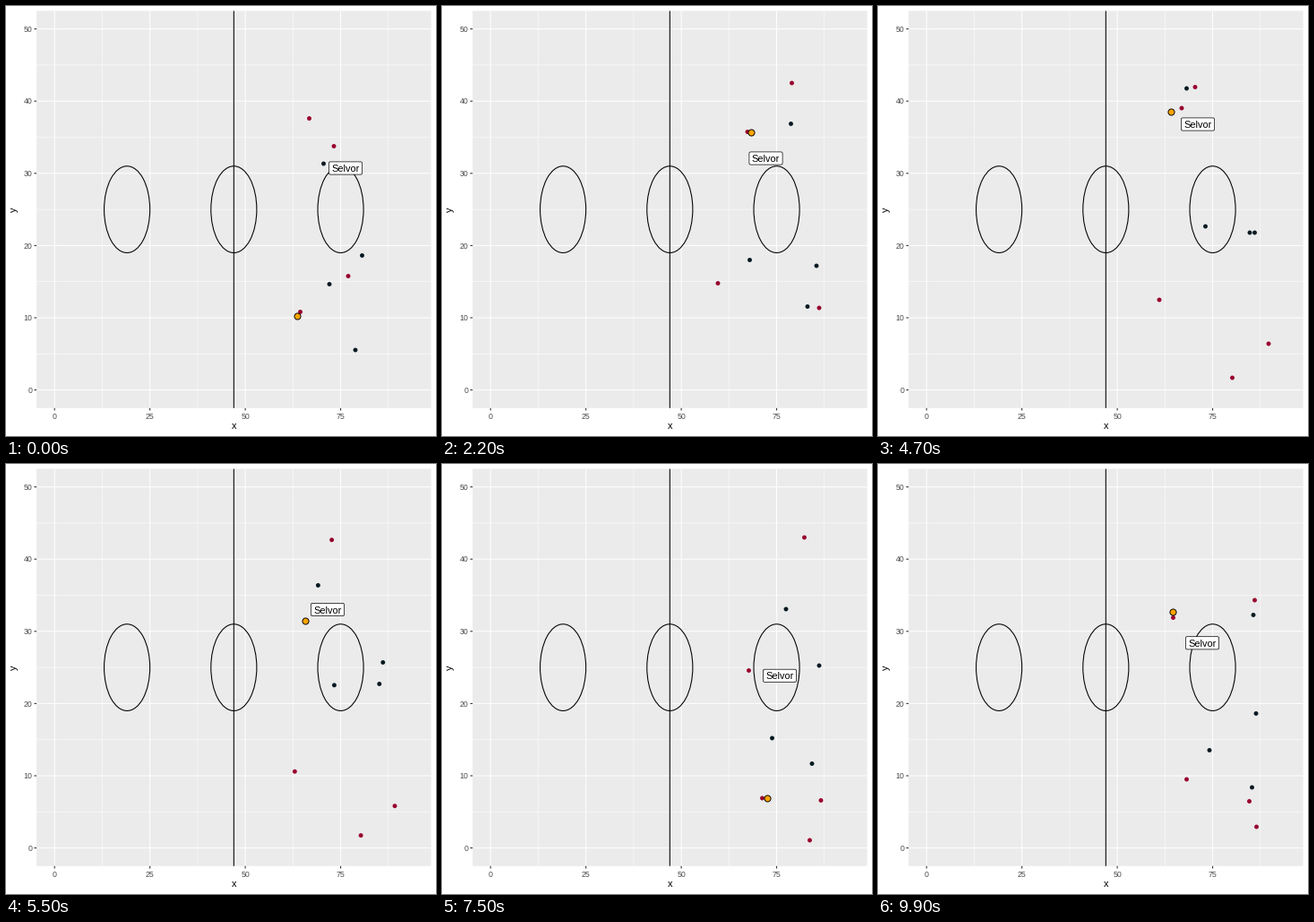
These frames come from a looping animation (480 px wide and 480 px high, 10000 ms). A matplotlib script:

```python
import numpy as np
import matplotlib.pyplot as plt
from matplotlib.animation import FuncAnimation
from matplotlib.patches import Ellipse, FancyBboxPatch, Rectangle

plt.rcParams["font.family"] = "Liberation Sans"

SIZE, DPI = 480, 72
FRAMES, STEP = 100, 100
LEFT, RIGHT, TOP, BOTTOM = 34.2, 474.5, 5.5, 448.8
MAROON, DARK, ORANGE = "#98002E", "#061922", "#FFA500"
NAME = "Selvor"


def court_x(v):
    return 54.2 + 4.258 * v


def court_y(v):
    return 428.6 - 8.06 * v


# Stage positions at the shared key times (seconds)
TIMES = [0, 2.2, 3.5, 4.7, 6.2, 7.5, 9.9]
OFFENCE = [
    [(366, 156.5), (390.5, 86), (368, 59.5), (354, 90.5), (378, 80), (404.5, 82), (420.5, 152)],
    [(338.5, 125.5), (341, 140.5), (358, 112), (339, 114), (353, 210.5), (342.5, 230.5), (329.5, 171.5)],
    [(328.5, 341.5), (308, 309.5), (310, 310), (314, 328), (333, 356), (357.5, 373), (344.5, 352)],
    [(382, 301.5), (421, 337), (435, 358), (436, 377), (432, 383.5), (423, 375.5), (414.5, 376.5)],
    [(404, 434), (412, 432), (405.5, 422), (395.5, 415), (397.5, 414.5), (410.5, 420), (422.5, 405)],
]
DEFENCE = [
    [(354.5, 176), (389.5, 131.5), (377, 78), (344.5, 92), (355.5, 165), (384, 162), (419, 168.5)],
    [(361, 310.5), (343.5, 283.5), (353, 264.5), (365.5, 246), (367, 249), (368.5, 306), (370, 319.5)],
    [(397.5, 278.5), (418, 290), (427, 289.5), (420.5, 253), (421, 205.5), (421, 225), (422, 278.5)],
    [(390, 384), (408, 335.5), (411, 303), (415, 253), (417.5, 243), (413, 334.5), (417.5, 361)],
]
TAGGED = [(379, 181), (361.5, 170), (367, 142), (357, 132), (362.5, 200), (377, 236.3), (362, 199.8)]
BALL = [(324.5, 346), (345, 140.5), (360, 54.5), (326.5, 117.5), (345, 235.5), (362.5, 372.5), (329, 165)]
BALL_EXTRA = [(0.9, 315, 331), (1.6, 341, 140), (3.1, 357, 48.5), (8.3, 357, 366), (9.0, 333, 190)]


def smooth(t, times, values):
    """Monotone cubic through the key values, without overshoot."""
    h = np.diff(times)
    slope = np.diff(values) / h
    m = np.concatenate([slope[:1], np.zeros(len(h) - 1), slope[-1:]])
    for k in range(1, len(h)):
        a, b = slope[k - 1], slope[k]
        if a * b > 0:
            m[k] = 2 * a * b / (a + b)
    k = np.clip(np.searchsorted(times, t, side="right") - 1, 0, len(h) - 1)
    u = (t - times[k]) / h[k]
    return ((1 + 2 * u) * (1 - u) ** 2 * values[k] + u * (1 - u) ** 2 * h[k] * m[k]
            + u * u * (3 - 2 * u) * values[k + 1] + u * u * (u - 1) * h[k] * m[k + 1])


def track(keys, extra=()):
    rows = sorted([(t, *p) for t, p in zip(TIMES, keys)] + list(extra))
    times, xs, ys = np.array(rows, float).T
    t = np.arange(FRAMES) * STEP / 1000
    return np.column_stack([smooth(t, times, xs), smooth(t, times, ys)])


extras = {3: [(4.1, 438.5, 369)]}
players = np.array([track(keys, extras.get(i, ())) for i, keys in enumerate(OFFENCE)]
                   + [track(keys) for keys in DEFENCE])
# Players beyond the sideline are not drawn
players[players[..., 1] > court_y(0)] = np.nan
tagged = track(TAGGED)
ball_path = track(BALL, BALL_EXTRA)

fig = plt.figure(figsize=(SIZE / DPI, SIZE / DPI), dpi=DPI, facecolor="white")
ax = fig.add_axes([0, 0, 1, 1])
ax.set(xlim=(0, SIZE), ylim=(SIZE, 0))
ax.axis("off")


def line(x0, y0, x1, y1, color, width, z):
    ax.plot([x0, x1], [y0, y1], color=color, lw=width, zorder=z,
            solid_capstyle="butt", snap=False)


def write(x, y, s, size, color, **kw):
    return ax.text(x, y, s, fontsize=size, color=color, **kw)


ax.add_patch(Rectangle((LEFT, TOP), RIGHT - LEFT, BOTTOM - TOP, color="#EBEBEB",
                       lw=0, zorder=0, snap=False))
for v in np.arange(12.5, 90, 25):
    line(court_x(v), TOP, court_x(v), BOTTOM, "white", 0.53, 1)
for v in range(5, 50, 10):
    line(LEFT, court_y(v), RIGHT, court_y(v), "white", 0.53, 1)
for v in range(0, 100, 25):
    x = court_x(v)
    line(x, TOP, x, BOTTOM, "white", 1.07, 2)
    line(x, BOTTOM, x, BOTTOM + 2.74, "#333333", 1.07, 2)
    write(x, 461, str(v), 8.8, "#4D4D4D", ha="center", va="baseline")
for v in range(0, 60, 10):
    y = court_y(v)
    line(LEFT, y, RIGHT, y, "white", 1.07, 2)
    line(LEFT - 2.74, y, LEFT, y, "#333333", 1.07, 2)
    write(29.3, y + 3.2, str(v), 8.8, "#4D4D4D", ha="right", va="baseline")
write(254.3, 471.5, "x", 11, "black", ha="center", va="baseline")
write(9, 227.2, "y", 11, "black", ha="center", va="center", rotation=90)

for v in (19, 47, 75):
    ax.add_patch(Ellipse((court_x(v), court_y(25)), 12 * 4.258, 12 * 8.06,
                         fill=False, ec="black", lw=1.07, zorder=3))
line(court_x(47), TOP, court_x(47), BOTTOM, "black", 1.07, 3)

colors = [MAROON] * len(OFFENCE) + [DARK] * len(DEFENCE)
dots = ax.scatter(players[:, 0, 0], players[:, 0, 1], s=4.9 ** 2, c=colors,
                  lw=0, zorder=4, plotnonfinite=True)
ball = ax.scatter(*ball_path[0], s=7.1 ** 2, c=ORANGE, ec="black", lw=0.94, zorder=5)

TAG_W, TAG_H = 37.2, 14.2
tag = FancyBboxPatch((0, 0), TAG_W, TAG_H, boxstyle="round,pad=0,rounding_size=1.7",
                     fc="white", ec="black", lw=0.71, zorder=6)
ax.add_patch(tag)
tag_text = write(0, 0, NAME, 11, "black", ha="center", va="baseline", zorder=7)


def draw(i):
    dots.set_offsets(np.ma.masked_invalid(players[:, i]))
    ball.set_offsets(ball_path[i])
    x, y = tagged[i]
    tag.set_bounds(x - TAG_W / 2, y - TAG_H / 2, TAG_W, TAG_H)
    tag_text.set_position((x, y + 4))
    return dots, ball, tag, tag_text


anim = FuncAnimation(fig, draw, frames=FRAMES, interval=STEP, repeat=True,
                     repeat_delay=0, blit=False)
plt.show()
```
